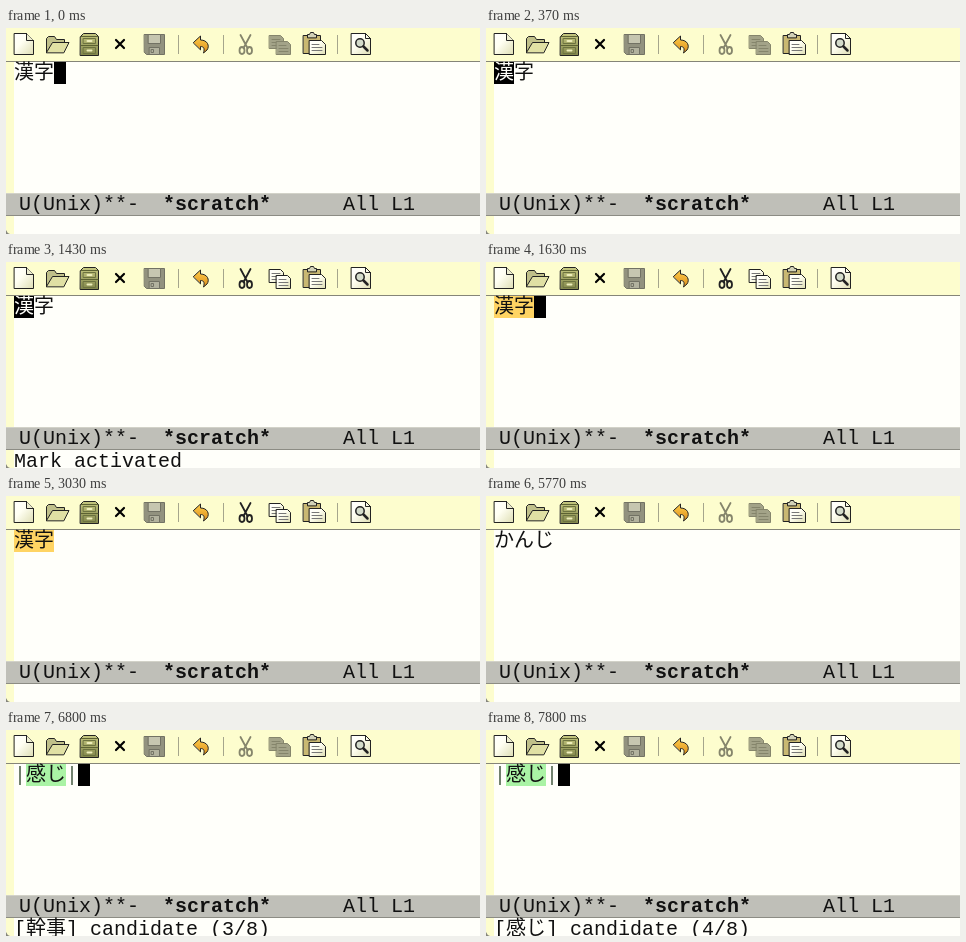
An HTML page for the animation above (8000 ms loop, 474x206 px).

```html
<!DOCTYPE html>
<html lang="ja">
<head>
<meta charset="utf-8">
<title>Kanji conversion</title>
<style>
html, body { margin: 0; width: 100%; height: 100%; overflow: hidden; background: #fffffa; }
svg { display: block; }
text { font: 300 20px "Liberation Mono", "Noto Sans CJK JP", monospace; white-space: pre; fill: #111; }
.bold { font-weight: bold; }
.pipe { fill: #53664f; }
.icon { stroke: #222; stroke-linejoin: round; stroke-linecap: round; fill: none; }
.off { stroke: #85856c; }
.off .sheet { fill: #a3a388; }
.off .line { stroke: #85856c; }
</style>
</head>
<body>
<svg width="474" height="206" viewBox="0 0 474 206">
  <defs>
    <linearGradient id="paper" x2="1" y2="1"><stop stop-color="#fff"/><stop offset=".4" stop-color="#fffff2"/><stop offset="1" stop-color="#dedeb4"/></linearGradient>
    <linearGradient id="olive" x2="0" y2="1"><stop stop-color="#c6c880"/><stop offset="1" stop-color="#80854a"/></linearGradient>
    <linearGradient id="orange" x2="0" y2="1"><stop stop-color="#ffcd4a"/><stop offset="1" stop-color="#dc8e1c"/></linearGradient>
  </defs>
  <rect width="474" height="206" fill="#fffffa"/>
  <rect y="34" width="8" height="172" fill="#fdfdce"/>
  <rect width="474" height="33" fill="#fdfdce"/>
  <rect y="33" width="474" height="1" fill="#858578"/>

  <!-- New file, open, folder cabinet, close, save -->
  <g class="icon">
    <path d="M8.500 5.500h12l7 7v14h-19z" fill="url(#paper)"/>
    <path d="M20.500 5.500v7h7" fill="#eeeed0"/>
    <path d="M40.500 24.500v-14l2-2h6l2 3h8v4" fill="#c0c08a"/>
    <path d="M40.500 24.500l6-10h16.500l-5 10z" fill="#e0e0a4"/>
    <path d="M74.500 8.500l3-3h12l3 3v19h-18z" fill="url(#olive)"/>
    <path d="M75 8.500h17M75 17.500h17" stroke="#5c6232"/>
    <path d="M77.500 10.500h12v5h-12zM77.500 19.500h12v6h-12z" stroke="#6c7240"/>
    <path d="M81.500 13h4M81.500 22.500h4" stroke="#eeeebb" stroke-width="2"/>
    <path d="M110 12l8 8M118 12l-8 8" stroke="#000" stroke-width="2.2"/>
    <g stroke="#727264">
      <path d="M138.500 6.500h20v20h-18l-2-2z" fill="#92927f"/>
      <path d="M142.500 6.500h12v9h-12z" fill="#c6c6b0"/>
      <path d="M143.500 19.500h10v7h-10z" fill="#b2b29e"/>
      <path d="M145.500 21.500h2v3h-2z"/>
    </g>
  </g>
  <path d="M172.500 7v19M217.500 7v19M331.500 7v19" stroke="#a5a58c"/>

  <!-- Undo -->
  <g class="icon">
    <path d="M187.500 14.500l7-6.500v4c7 0 9.500 6 6.500 10l-3.500 3c1.500-5 0-6.500-3-6.500v3z" fill="url(#orange)"/>
  </g>

  <!-- Cut and copy -->
  <g id="edit" class="icon">
    <path d="M234.500 7l7 13M244.500 7l-7 13" stroke-width="1.800"/>
    <ellipse cx="236" cy="22.500" rx="2.500" ry="3.500" stroke-width="1.800"/>
    <ellipse cx="243.500" cy="22.500" rx="2.500" ry="3.500" stroke-width="1.800"/>
    <path class="sheet" d="M263.500 7.500h11l3 3v10h-14z" fill="url(#paper)"/>
    <path class="line" d="M266 11.500h8M266 14.500h8M266 17.500h5" stroke="#777"/>
    <path class="sheet" d="M270.500 13.500h11l3 3v10h-14z" fill="url(#paper)"/>
    <path class="line" d="M273 17.500h7M273 20.500h9M273 23.500h9" stroke="#777"/>
  </g>

  <!-- Paste and search -->
  <g class="icon">
    <path d="M297.500 7.500h17v18h-17z" fill="#c9b872"/>
    <path d="M301.500 9.500v-3h2l1-2h3l1 2h2v3z" fill="#d2d2b8"/>
    <path d="M303.500 12.500h12l4 4v10h-16z" fill="url(#paper)"/>
    <path d="M306 16.500h7M306 19.500h10M306 22.500h10" stroke="#777"/>
    <path d="M345.500 5.500h14l5 5v16h-19z" fill="url(#paper)"/>
    <path d="M359.500 5.500v5h5"/>
    <circle cx="354" cy="15" r="4.200" fill="#d4dccb" stroke-width="1.500"/>
    <path d="M357.500 18.500l4 4" stroke-width="2.500"/>
  </g>

  <!-- Buffer -->
  <rect id="mark" y="34" height="22"/>
  <text id="pipeLeft" class="pipe" x="8" y="51">|</text>
  <text id="pipeRight" class="pipe" y="51">|</text>
  <text id="word" y="51"></text>
  <rect id="cursor" y="34" height="22"/>
  <text id="under" x="8" y="51" style="fill:#fffffa"></text>

  <!-- Mode line and echo area -->
  <rect y="165" width="474" height="23" fill="#bfbfb8"/>
  <path d="M0 165.500h474" stroke="#d2d2c8"/>
  <path d="M0 187.500h474" stroke="#8c8c84"/>
  <text x="13" y="182">U(Unix)**-</text>
  <text x="157" y="182" class="bold">*scratch*</text>
  <text x="337" y="182">All L1</text>
  <text id="echo" x="8" y="205"></text>
  <path d="M0 202q1 3 4 4h-4z" fill="#85857d"/>
</svg>
<script>
const LOOP = 8000, LEFT = 8, CELL = 12, KANJI = 20, HIDDEN = null;
const $ = id => document.getElementById(id);
const set = (id, attrs) => {
  for (const name in attrs) $(id).setAttribute(name, attrs[name]);
};
const candidate = (word, n) => `[${word}] candidate (${n}/8)`;

// Each step changes only the listed parts of the editor state.
const steps = [
  [0, { word: '漢字', mode: 'plain', cursor: 48, echo: '', canCut: false }],
  [370, { cursor: LEFT }],
  [1270, { cursor: HIDDEN }],
  [1400, { cursor: LEFT }],
  [1430, { echo: 'Mark activated', canCut: true }],
  [1600, { mode: 'region', cursor: 48 }],
  [1630, { echo: '' }],
  [2500, { cursor: HIDDEN }],
  [3000, { cursor: 48 }],
  [3030, { cursor: HIDDEN }],
  [5770, { word: 'かんじ', mode: 'plain', canCut: false }],
  [6370, { word: 'カンジ', mode: 'candidate', cursor: 92, echo: candidate('カンジ', 2) }],
  [6430, { word: '幹事', cursor: 72 }],
  [6470, { echo: candidate('幹事', 3) }],
  [6800, { word: '感じ' }],
  [6830, { echo: candidate('感じ', 4) }],
  [7470, { cursor: HIDDEN }],
  [7800, { cursor: 72 }]
];
const markColor = { plain: 'none', region: '#ffd463', candidate: '#aaf3a5' };

function draw(time) {
  const state = Object.assign({}, ...steps.filter(([at]) => at <= time).map(([, change]) => change));
  const { word, mode, cursor, echo, canCut } = state;
  const converting = mode === 'candidate';
  const start = converting ? LEFT + CELL : LEFT;
  const width = word.length * KANJI;
  const onWord = cursor === LEFT;
  const visibility = converting ? 'visible' : 'hidden';

  $('word').textContent = word;
  $('under').textContent = onWord ? word[0] : '';
  $('echo').textContent = echo;
  set('word', { x: start });
  set('mark', { x: start, width, fill: markColor[mode] });
  set('pipeLeft', { visibility });
  set('pipeRight', { x: start + width, visibility });
  set('cursor', { x: cursor ?? 0, width: cursor === HIDDEN ? 0 : onWord ? KANJI : CELL });
  set('edit', { class: canCut ? 'icon' : 'icon off' });
}

const origin = performance.now();
function tick() {
  draw((performance.now() - origin) % LOOP);
  requestAnimationFrame(tick);
}
tick();
</script>
</body>
</html>
```
